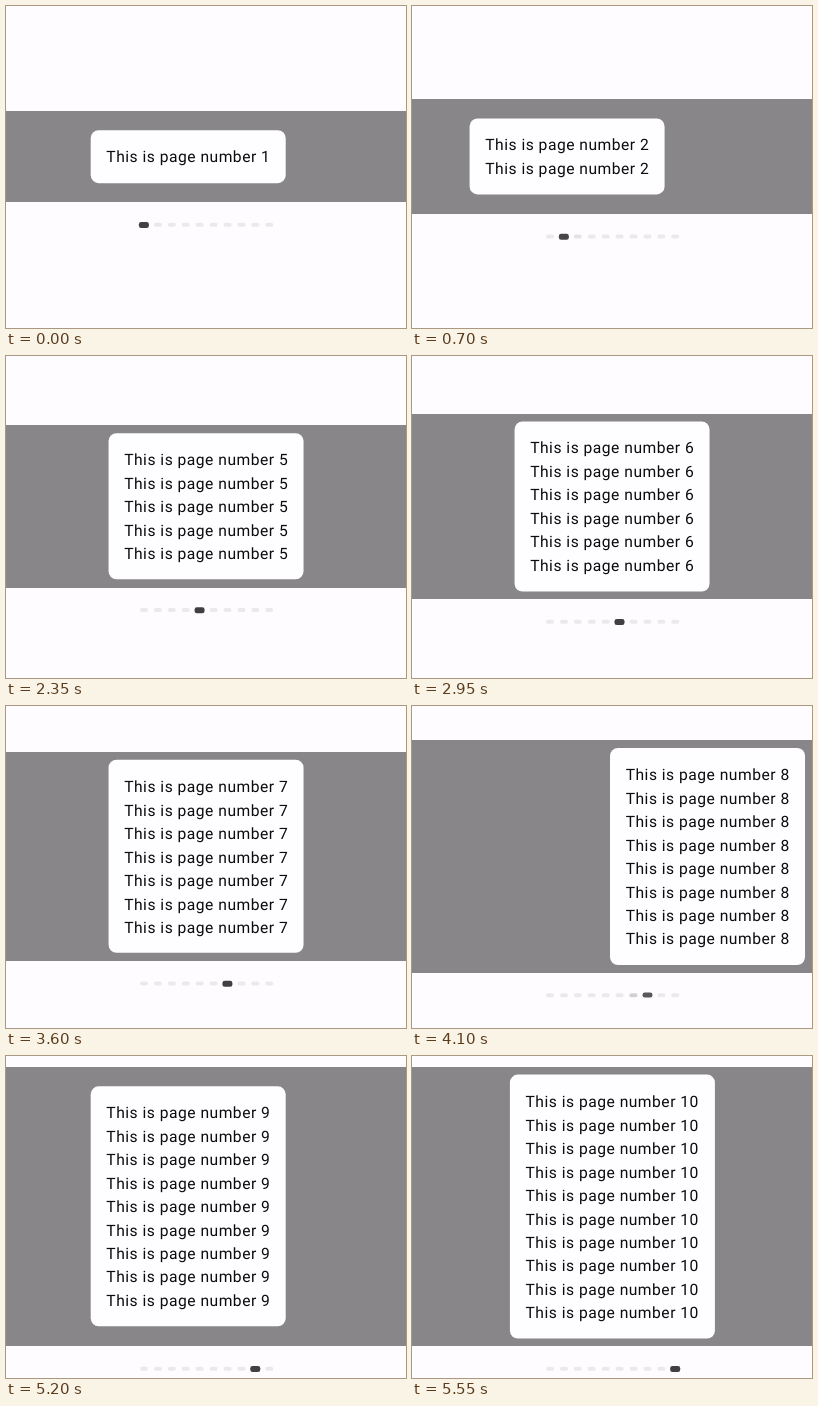
An HTML page for the animation above (5700 ms loop, 400 by 322 pixels).

```html
<!DOCTYPE html>
<html lang="en">
<head>
<meta charset="utf-8">
<title>Pager</title>
<style>
  html, body { margin: 0; width: 100%; height: 100%; overflow: hidden; background: #fffcff; }
  #stage { position: relative; width: 400px; height: 322px; overflow: hidden; }
  #band { position: absolute; left: 0; width: 400px; background: #888688; }
  .card {
    position: absolute; left: 0; top: 0; box-sizing: border-box;
    padding: 15.2px 15.65px 0; border-radius: 8px; background: #fefdff;
    font: 15.65px/23.47px Roboto, sans-serif; letter-spacing: .49px;
    text-rendering: geometricPrecision; white-space: pre; color: #0c0b0d;
  }
  .dot { position: absolute; left: 0; top: 0; border-radius: 2.3px; }
</style>
</head>
<body>
<div id="stage"><div id="band"></div></div>
<script>
const LOOP = 5700, TICK = 50, PAGES = 10;
const MID_X = 200.2, MID_Y = 150.45, PAGE_W = 394.2;
const STIFFNESS = 0.024;

// Each swipe: first moving tick, settled tick, spring release time
const SWIPES = [
  [0, 350, -14], [700, 1050, 676], [1350, 1600, 1385.5],
  [2000, 2350, 1986], [2650, 2950, 2636], [3300, 3600, 3286],
  [4000, 4300, 3986], [4600, 4950, 4586], [5200, 5550, 5186]
];

const stage = document.getElementById('stage');
const band = document.getElementById('band');

const add = (cls, text = '') => {
  const el = document.createElement('div');
  el.className = cls;
  el.textContent = text;
  return stage.appendChild(el);
};
const cardHeight = n => 29.1 + 23.47 * n;
const mix = (a, b, k) => a + (b - a) * k;
const smooth = k => k * k * (3 - 2 * k);

const cards = [], dots = [];
for (let n = 1; n <= PAGES; n++) {
  const card = add('card', Array(n).fill('This is page number ' + n).join('\n'));
  card.style.height = cardHeight(n) + 'px';
  cards.push(card);
  dots.push(add('dot'));
}

// Critically damped spring
function progress(t, [first, last, release]) {
  if (t < first) return 0;
  if (t >= last) return 1;
  const x = Math.max(0, t - release) * STIFFNESS;
  return Math.max(0.008, 1 - (1 + x) * Math.exp(-x));
}

function draw(t) {
  const pos = SWIPES.reduce((sum, s) => sum + progress(t, s), 0);

  // The band fits the tallest visible page
  const height = cardHeight(Math.ceil(pos) + 1) + 15.8;
  const bottom = MID_Y + height / 2;
  band.style.top = bottom - height + 'px';
  band.style.height = height + 'px';

  cards.forEach((card, i) => {
    const shift = i - pos;
    card.style.visibility = Math.abs(shift) < 1 ? 'visible' : 'hidden';
    const x = MID_X + shift * PAGE_W;
    const y = MID_Y - cardHeight(i + 1) / 2;
    card.style.transform = `translate(${x}px, ${y}px) translateX(-50%)`;
  });

  dots.forEach((dot, i) => {
    const k = smooth(Math.max(0, 1 - Math.abs(i - pos)));
    const w = mix(8, 10.2, k), h = mix(4, 5.6, k);
    const c = Math.round(mix(234, 64, k));
    dot.style.width = w + 'px';
    dot.style.height = h + 'px';
    dot.style.background = `rgb(${c}, ${c - 1}, ${c + 1})`;
    dot.style.transform =
      `translate(${138 + i * 13.92 - w / 2}px, ${bottom + 22.5 - h / 2}px)`;
  });
}

const start = performance.now();
function frame() {
  const t = (performance.now() - start) % LOOP;
  draw(Math.floor(t / TICK) * TICK);
  requestAnimationFrame(frame);
}
frame();
</script>
</body>
</html>
```
